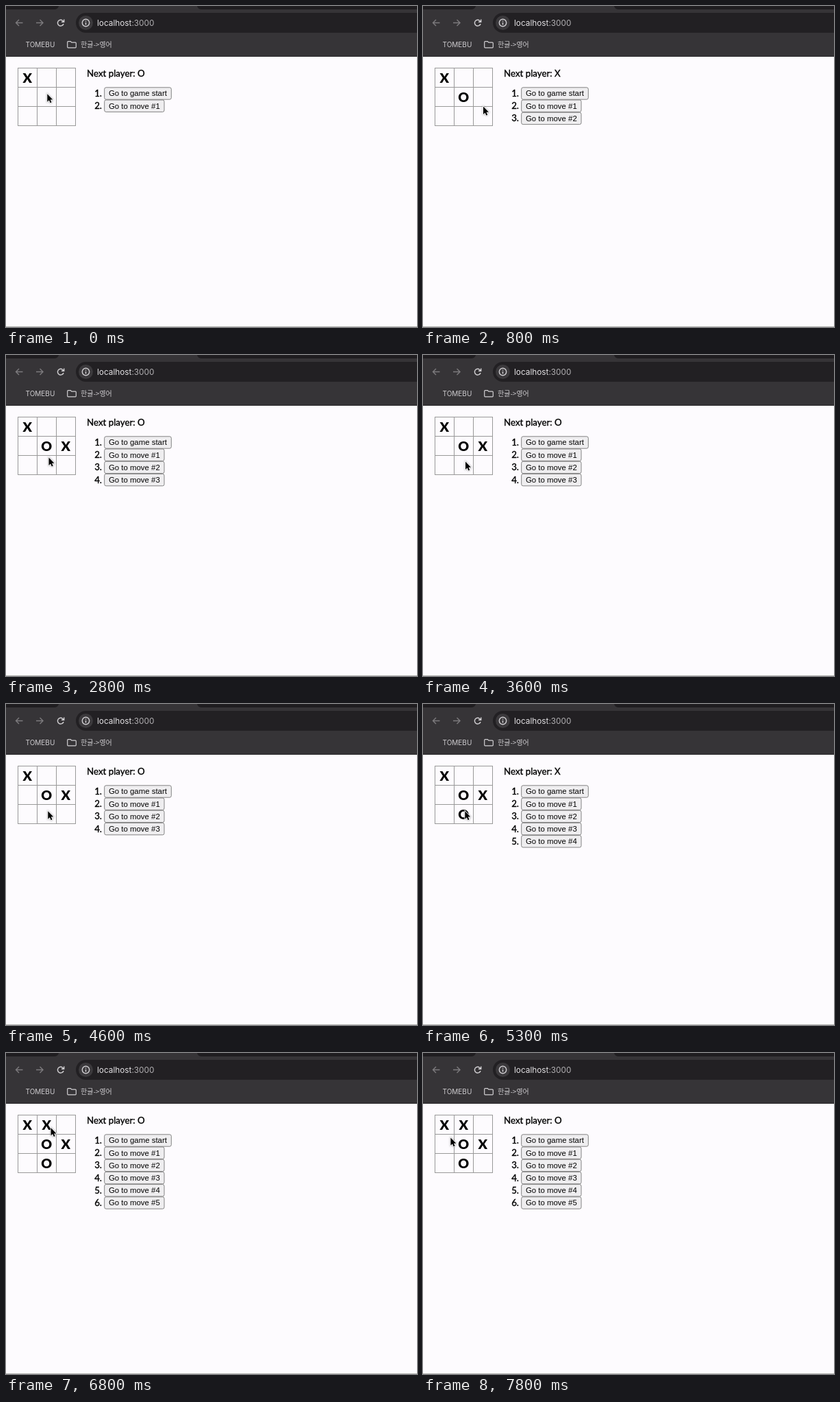
An HTML page that plays this animation: 600x468 px, repeating every 8 s.

```html
<!DOCTYPE html>
<html lang="en">
<head>
<meta charset="utf-8">
<title>Tic-tac-toe</title>
<style>
  html, body { margin: 0; width: 100%; height: 100%; overflow: hidden; background: #fdfbfe; }
  svg { display: block; }
  .ui { font-family: Inter, sans-serif; fill: #e3e1e4; }
  .body { font: 13.3px Lato, sans-serif; stroke: #000; stroke-width: .35; }
  .mark { font: 900 19.5px Lato, sans-serif; text-anchor: middle; }
  .button { font: 11.4px "Liberation Sans", Arial, sans-serif; }
  .icon { fill: none; stroke: #d2d0d3; stroke-width: 1.4; }
</style>
</head>
<body>
<svg width="600" height="468" viewBox="0 0 600 468">
  <!-- browser chrome -->
  <rect width="600" height="74" fill="#363437"/>
  <path d="M0 0H77Q76 5 70 5H0ZM279 0H600V5H286Q280 5 279 0Z" fill="#1f1d20"/>
  <rect y="73" width="600" height="1" fill="#2c2a2d"/>
  <rect x="102" y="10" width="530" height="29" rx="14.5" fill="#222023"/>
  <circle cx="116.5" cy="24.5" r="10.5" fill="#3b393c"/>
  <g class="icon">
    <g stroke="#7c7a7d">
      <path d="M24.5 24.5H14.5M19 20L14.5 24.5L19 29" style="stroke:#7c7a7d"/>
      <path d="M44 24.5H54M49.5 20L54 24.5L49.5 29" style="stroke:#7c7a7d"/>
    </g>
    <path d="M84 26A4.4 4.4 0 1 1 82.8 21.4L84.5 23M84.7 19.5V23.2H81"/>
    <circle cx="116.5" cy="24.5" r="5.2"/>
    <path d="M116.5 24V27.5M116.5 21.4V22.8"/>
    <path d="M89.7 52.6Q89.7 51.6 90.7 51.6H94.3L95.8 53.2H101.3Q102.3 53.2 102.3 54.2V59.8Q102.3 60.8 101.3 60.8H90.7Q89.7 60.8 89.7 59.8Z" stroke-width="1.2"/>
  </g>
  <text class="ui" x="133" y="29" font-size="11.8">localhost<tspan fill="#b3b1b4">:3000</tspan></text>
  <text class="ui" x="28.5" y="59.5" font-size="10" style="fill:#cfcdd0">TOMEBU</text>
  <text x="109" y="59.5" font-size="10" fill="#cfcdd0" font-family="'Noto Sans CJK KR', 'Noto Sans CJK', sans-serif">한글-&gt;영어</text>
  <rect y="467" width="600" height="1" fill="#b4b3b2"/>

  <!-- game -->
  <path d="M17.5 90V175M45.5 90V175M73.5 90V175M101.5 90V175M17 90.5H102M17 118.5H102M17 146.5H102M17 174.5H102" stroke="#999" fill="none"/>
  <text id="status" class="body" x="118" y="103"></text>
  <g id="game"></g>
  <path id="cursor" d="M0 0V11.4L2.6 9L4.3 13L6.2 12.2L4.5 8.3H8Z" stroke="#fff" stroke-width="1.6" paint-order="stroke" style="filter:drop-shadow(0 .8px .8px #0006)"/>
</svg>
<script>
const LOOP = 8000, TICK = 100;
const $ = id => document.getElementById(id);

// [time, board cell]; X and O alternate
const plays = [[0, 0], [300, 4], [2000, 5], [5300, 7], [6300, 1]];

// [start, ticks, x, y]: the pointer tip moves there from its previous place
const moves = [
  [0, 1, 60.3, 128.3], [100, 1, 61, 129],
  [600, 1, 66, 126], [700, 2, 88, 146.5], [900, 2, 88, 130],
  [1500, 1, 88, 130.4], [2500, 4, 62.5, 149.5],
  [3200, 2, 66, 153], [3400, 3, 62, 155.5],
  [3900, 1, 60.5, 156], [4000, 1, 62, 155.7], [4200, 1, 62.3, 156],
  [4500, 2, 61.3, 156.3], [5700, 3, 65, 109],
  [6800, 2, 66, 109.2], [7200, 7, 40.4, 123.4]
];

function add(parent, tag, attrs, text = "") {
  const node = document.createElementNS("http://www.w3.org/2000/svg", tag);
  for (const key in attrs) node.setAttribute(key, attrs[key]);
  node.textContent = text;
  return parent.appendChild(node);
}

function addRow(parent, i) {
  const y = 119 + i * 18.2;
  add(parent, "text", { class: "body", x: 140, y: y + 13, "text-anchor": "end" }, `${i + 1}.`);
  add(parent, "rect", {
    x: 143.7, y: y - .2, width: i ? 87.3 : 97.6, height: 17.4, rx: 2.4,
    fill: "#efeef0", stroke: "#777", "stroke-width": .9
  });
  add(parent, "text", { class: "button", x: 150, y: y + 12.4 }, i ? `Go to move #${i}` : "Go to game start");
}

addRow($("game"), 0);
const turns = plays.map(([time, cell], i) => {
  const group = add($("game"), "g", {});
  add(group, "text", { class: "mark", x: 31.3 + cell % 3 * 28, y: 112 + Math.floor(cell / 3) * 28 }, "XO"[i % 2]);
  addRow(group, i + 1);
  return group;
});

function pointerAt(t) {
  let [, , x, y] = moves[0];
  for (const [start, ticks, toX, toY] of moves) {
    if (t < start) break;
    const p = Math.min(1, ((t - start) / TICK + 1) / ticks);
    const ease = p * p * (3 - 2 * p);
    x += (toX - x) * ease;
    y += (toY - y) * ease;
  }
  return [x, y];
}

function draw() {
  const t = Math.floor(performance.now() % LOOP / TICK) * TICK;
  const count = plays.filter(([time]) => time <= t).length;
  turns.forEach((group, i) => group.setAttribute("visibility", i < count ? "visible" : "hidden"));
  $("status").textContent = `Next player: ${"XO"[count % 2]}`;
  $("cursor").setAttribute("transform", `translate(${pointerAt(t)})`);
  requestAnimationFrame(draw);
}
draw();
</script>
</body>
</html>
```
